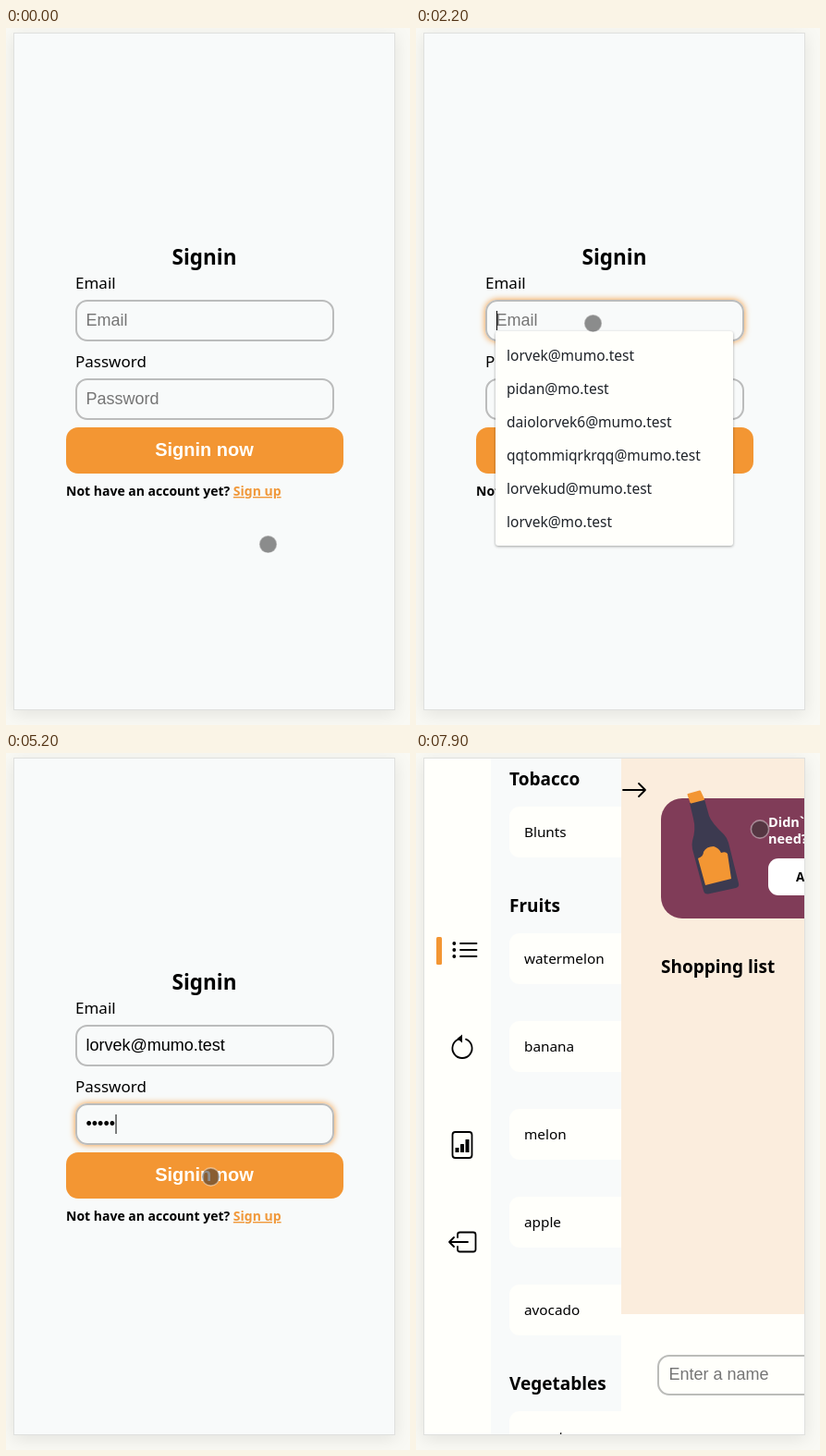
These frames come from a looping animation (437x754 px, 8000 ms). An HTML page:

```html
<!DOCTYPE html>
<html lang="en">
<head>
<meta charset="utf-8">
<title>Sign in flow</title>
<style>
  html, body { margin: 0; width: 100%; height: 100%; overflow: hidden; background: #f9f9f4; }
  svg { display: block; width: 437px; height: 754px; }
  text { font-family: Ubuntu, "Noto Sans", "Open Sans", sans-serif; white-space: pre; }
  .title { font-size: 22.5px; font-weight: 700; text-anchor: middle; }
  .label { font-size: 17px; }
  .input, .button { font-family: "Liberation Sans", Arial, sans-serif; }
  .input { font-size: 18px; }
  .hint { fill: #757575; }
  .button { font-size: 20px; font-weight: 700; fill: #fffffb; text-anchor: middle; }
  .note { font-size: 14px; font-weight: 700; }
  .link { fill: #f0983a; text-decoration: underline; }
  .option { font-size: 15.5px; font-weight: 500; fill: #1f2329; }
  .item { font-size: 15.3px; }
  .head { font-size: 19px; font-weight: 700; }
  .banner { font-size: 14.5px; font-weight: 700; fill: #fff; }
  .small { font-size: 13.5px; font-weight: 700; }
  .icon { fill: none; stroke: #000; stroke-width: 1.8; stroke-linecap: round; stroke-linejoin: round; }
  .frame { filter: drop-shadow(0 4px 9px rgba(0, 0, 0, .09)); }
  .glow { filter: drop-shadow(0 0 3.5px #f39633); }
  .popup { filter: drop-shadow(0 1px 1.5px rgba(0, 0, 0, .35)); }
</style>
</head>
<body>
<svg id="stage" viewBox="0 0 437 754">
  <defs><clipPath id="screen"><rect x="9" y="6" width="411" height="731"/></clipPath></defs>
  <rect class="frame" x="8.5" y="5.5" width="412" height="732" fill="#f8fafa" stroke="#dfe0de"/>
</svg>
<script>
const LOOP = 8000, STEP = 100;
const ORANGE = '#f39633', WHITE = '#fffffb', PAGE = '#f8fafa';
const stage = document.getElementById('stage');

function add(parent, tag, attrs = {}, text) {
  const el = document.createElementNS('http://www.w3.org/2000/svg', tag);
  for (const key in attrs) el.setAttribute(key, attrs[key]);
  if (text !== undefined) el.textContent = text;
  parent.append(el);
  return el;
}
const group = parent => add(parent, 'g');
const rect = (p, x, y, width, height, rx, fill, more) =>
  add(p, 'rect', { x, y, width, height, rx, fill, ...more });
const label = (p, x, y, cls, text) => add(p, 'text', { x, y, class: cls }, text);
const path = (p, d, attrs) => add(p, 'path', { d, ...attrs });
const set = (el, attrs) => { for (const key in attrs) el.setAttribute(key, attrs[key]); };
const show = (el, on) => { el.style.display = on ? '' : 'none'; };

// Sign-in and sign-up share one layout, one field every 85px.
function makeForm(title, top, fields, note, link) {
  const root = group(stage);
  label(root, 214.5, top, 'title', title);
  const inputs = fields.map(([name, hint], i) => {
    const y = top + 39 + i * 85;
    label(root, 75, y - 13, 'label', name);
    const glow = rect(root, 75, y - 1, 280, 45, 13, PAGE, { class: 'glow' });
    rect(root, 76, y, 278, 43, 12, PAGE, { stroke: '#bbbcbc', 'stroke-width': 2 });
    const text = label(root, 86.5, y + 27, 'input hint', hint);
    const caret = rect(root, 87, y + 11, 1, 21, 0, '#000');
    show(glow, false);
    show(caret, false);
    return { glow, text, caret, hint };
  });
  const by = top + 91 + fields.length * 85 - 85;
  rect(root, 65, by, 300, 50, 13, ORANGE);
  const button = label(root, 214.5, by + 31, 'button', title + ' now');
  const line = label(root, 65, by + 74, 'note', note + ' ');
  add(line, 'tspan', { class: 'link' }, link);
  return { root, inputs, button };
}

function setInput(input, value, focus) {
  input.text.textContent = value || input.hint;
  input.text.setAttribute('class', value ? 'input' : 'input hint');
  show(input.glow, focus);
  show(input.caret, focus);
  if (focus) input.caret.setAttribute('x', 87 + (value ? input.text.getComputedTextLength() : 0));
}

const signin = makeForm('Signin', 256, [['Email', 'Email'], ['Password', 'Password']],
  'Not have an account yet?', 'Sign up');
const signup = makeForm('Signup', 171,
  [['First Name', 'First Name'], ['Last name', 'Last Name'], ['Email', 'Email'], ['Password', 'Password']],
  'Already have an account?', 'Sign in');

// The sign-in button is at y 432, so nudge the taller form's shared maths stays valid.
const dots = [200, 215, 230].map(cx => add(signin.root, 'circle', { cx, cy: 458, fill: WHITE }));

const EMAIL = 'lorvek@mumo.test';
const LISTS = [
  [EMAIL, 'pidan@mo.test', 'daiolorvek6@mumo.test', 'qqtommiqrkrqq@mumo.test',
    'lorvekud@mumo.test', 'lorvek@mo.test'],
  [EMAIL, 'lorvekud@mumo.test', 'lorvek@mo.test', 'lunadi@mumo.test',
    'lorvekdud@mumo.test', 'lorvek@mo.test.zz'],
  [EMAIL, 'lorvekud@mumo.test', 'lorvek@mo.test', 'lorvekdud@mumo.test',
    'lorvek@mo.test.zz', 'lorvek@mumo.']
];
const popup = group(stage);
const sheet = rect(popup, 86, 328, 257, 232, 3, WHITE, { class: 'popup' });
const hover = rect(popup, 86, 336, 257, 36, 0, '#c9cac6');
const options = LISTS[0].map((_, i) => label(popup, 98, 360 + i * 36, 'option', ''));

function makeHome() {
  const clip = add(stage, 'g', { 'clip-path': 'url(#screen)' });
  rect(clip, 9, 6, 72, 731, 0, WHITE);
  rect(clip, 22, 199, 6, 30, 1.5, ORANGE);
  path(clip, 'M48 206H65.5M48 213H65.5M48 220H65.5M41 206h.6M41 213h.6M41 220h.6', { class: 'icon' });
  for (const cy of [206, 213, 220]) add(clip, 'circle', { cx: 41.3, cy, r: 1.9 });
  path(clip, 'M46 309.6A10.6 10.6 0 1 0 54 309.6', { class: 'icon' });
  path(clip, 'M44.5 309L50 304.5V313.5Z');
  rect(clip, 39.5, 410, 21, 28, 3, 'none', { class: 'icon' });
  [[42.5, 427, 5], [48, 423, 9], [53.5, 418, 14]].forEach(([x, y, h]) => rect(clip, x, y, 4, h, .5, '#000'));
  path(clip, 'M45 524V521Q45 518.5 47.500 518.5H62Q64.500 518.5 64.500 521V537Q64.500 539.5 62 539.5H47.500Q45 539.5 45 537V534M56 529H36M41 524L36 529L41 534',
    { class: 'icon' });

  [['Tobacco', 35], ['Fruits', 172], ['Vegetables', 689]].forEach(([s, y]) => label(clip, 101, y, 'head', s));
  [['Blunts', 58], ['watermelon', 195], ['banana', 290], ['melon', 385], ['apple', 480],
    ['avocado', 575], ['carrot', 712]].forEach(([s, y]) => {
    rect(clip, 101, y, 300, 55, 11, WHITE);
    label(clip, 117, y + 33, 'item', s);
  });

  const panel = group(clip);
  rect(panel, 222, 6, 389, 601, 0, '#fbeddd');
  rect(panel, 222, 607, 389, 130, 0, WHITE);
  path(panel, 'M224 40H248M241 33L248 40L241 47', { class: 'icon' });
  rect(panel, 265, 49, 303, 130, 23, '#803c58');
  path(panel, 'M296 54L312 50L317 68Q320 76 333 88Q336 91 338 97L349 141Q350 145 346 146L316 152.500Q312 153 311 149L299 104Q298 99 299 95Q303 82 300 71Z',
    { fill: '#3c3a50' });
  path(panel, 'M305 114Q311 112 311 107Q314 101 322 101Q328 103 330 108Q335 106 337 109L341 136L313 143Z',
    { fill: ORANGE });
  path(panel, 'M294.500 45L307 41.500L311 50L297.500 53.500Z',
    { fill: ORANGE, stroke: ORANGE, 'stroke-width': 2, 'stroke-linejoin': 'round' });
  label(panel, 381, 80, 'banner', 'Didn`t find what you');
  label(panel, 381, 98, 'banner', 'need?');
  rect(panel, 381, 114, 120, 40, 11, '#fff');
  label(panel, 411, 139, 'small', 'Add item');
  label(panel, 265, 238, 'head', 'Shopping list');
  rect(panel, 262, 652, 310, 42, 12, WHITE, { stroke: '#bbbcb9', 'stroke-width': 2 });
  label(panel, 273.5, 678, 'input hint', 'Enter a name');
  return { root: clip, panel };
}
const home = makeHome();

const cursor = add(stage, 'circle', {
  r: 9.6, fill: 'rgba(50,50,50,.55)', stroke: 'rgba(255,255,255,.4)', 'stroke-width': 1.6
});

// Pointer path: time, x, y
const TRACK = [
  [0, 283.5, 558.5], [100, 286, 562], [200, 286, 562], [500, 272, 502], [600, 290, 508], [800, 399.5, 563.5],
  [1000, 300, 603], [1200, 268, 595], [1500, 268, 595], [2000, 192, 319], [2200, 191.5, 319.5],
  [3100, 191.5, 319.5], [3200, 204.5, 362.5], [3400, 204.5, 362.5], [3700, 204.5, 398],
  [4900, 204.5, 398], [5200, 221.5, 458.5], [5300, 325, 498], [5400, 325, 498],
  [6000, 340.5, 315.5], [6700, 340.5, 315.5], [7000, 314, 200], [7200, 372, 86], [7300, 372, 86],
  [7400, 372, 82.5], [8000, 372, 82.5]
];
const EMAIL_STEPS = [[0, 0], [2400, 1], [2500, 2], [3200, EMAIL.length]];
const DOT_STEPS = [[0, 0], [4100, 1], [4300, 2], [4700, 4], [5000, 5]];

const stepAt = (table, t) => table.filter(row => row[0] <= t).pop()[1];
function pointAt(t) {
  const i = Math.max(1, TRACK.findIndex(row => row[0] >= t));
  const [t0, x0, y0] = TRACK[i - 1], [t1, x1, y1] = TRACK[i];
  const k = (t - t0) / (t1 - t0);
  return [x0 + (x1 - x0) * k, y0 + (y1 - y0) * k];
}

function drawPopup(t) {
  show(popup, t >= 2000 && t < 3400);
  const list = t < 2500 ? 0 : t < 2800 ? 1 : 2;
  options.forEach((el, i) => { el.textContent = LISTS[list][i]; });
  sheet.setAttribute('width', list === 1 ? 277 : 257);
  show(hover, t >= 3200);
  const fading = t >= 3300;
  set(popup, {
    opacity: fading ? .5 : 1,
    transform: fading ? 'translate(214.5 444) scale(.977) translate(-214.5 -444)' : ''
  });
}

function drawLoader(t) {
  const on = t >= 5500;
  show(signin.button, !on);
  const wave = Math.abs(1 - 2 * ((t - 5050 + LOOP) / 800 % 1));
  dots.forEach((dot, i) => {
    const k = i === 1 ? 1 - wave : wave;
    show(dot, on);
    set(dot, { r: 3 + 1.95 * k, 'fill-opacity': .5 + .5 * k });
  });
}

function draw(t) {
  const registering = t >= 600 && t < 1400, inside = t >= 6300;
  show(signin.root, !registering && !inside);
  show(signup.root, registering);
  show(home.root, inside);
  setInput(signin.inputs[0], EMAIL.slice(0, stepAt(EMAIL_STEPS, t)), t >= 2000 && t < 3600);
  setInput(signin.inputs[1], '•'.repeat(stepAt(DOT_STEPS, t)), t >= 3600 && t < 5500);
  drawPopup(t);
  drawLoader(t);
  const slide = Math.min(198, .36 * (7900 - t));
  show(home.panel, t >= 7400);
  home.panel.setAttribute('transform', `translate(${slide} 0)`);
  const [cx, cy] = pointAt(t);
  set(cursor, { cx, cy });
}

const start = performance.now();
function tick() {
  const t = (performance.now() - start) % LOOP;
  draw(Math.floor(t / STEP) * STEP);
  requestAnimationFrame(tick);
}
tick();
</script>
</body>
</html>
```
